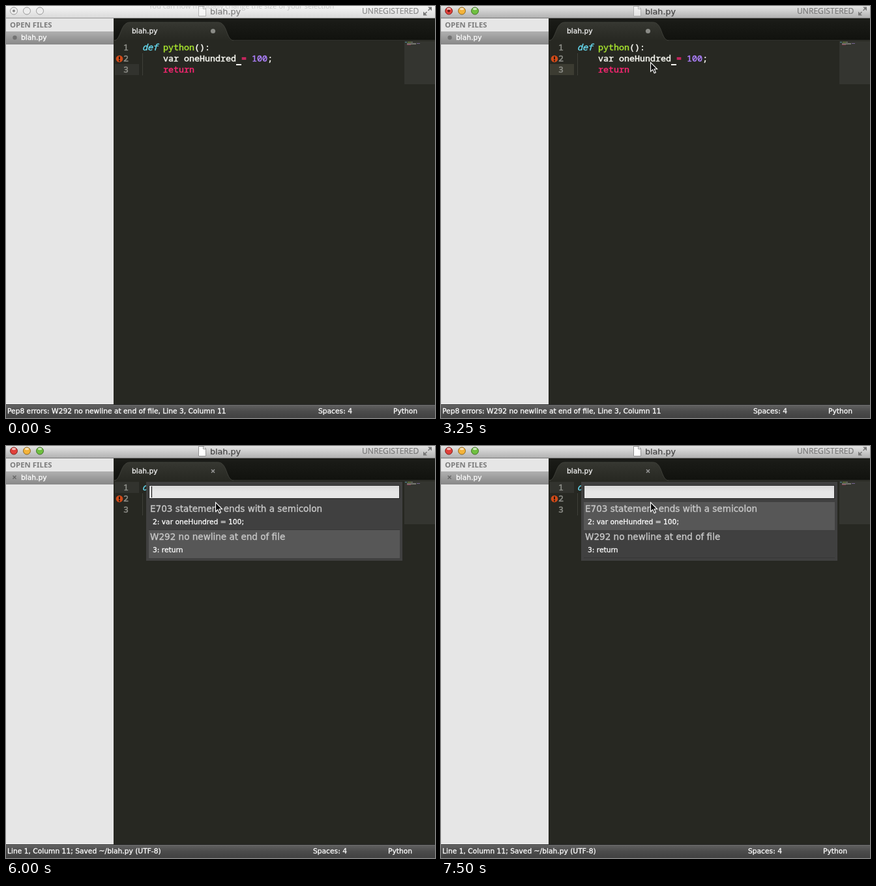
Animation, 658 px wide and 632 px high, one loop 8 s. Source, as an HTML page with a canvas:

```html
<!DOCTYPE html>
<html lang="en">
<head>
<meta charset="utf-8">
<title>Editor lint demo</title>
<style>
html, body { margin: 0; width: 658px; height: 632px; overflow: hidden; background: #272822; }
canvas { display: block; }
</style>
</head>
<body>
<canvas id="stage" width="658" height="632"></canvas>
<script>
const ctx = document.getElementById('stage').getContext('2d');
const LOOP = 8000;
const UI = '"DejaVu Sans", sans-serif';
const CAPS = '"Open Sans", sans-serif';
const MONO = '"Noto Sans Mono", monospace';
const SMALL = '10.7px ' + UI;
const CODE = '13.33px ' + MONO;
const CYAN = '#66d9ef', GREEN = '#a6e22e', PINK = '#f92672', PURPLE = '#ae81ff', WHITE = '#f8f8f2';

function rect(x, y, w, h, fill) {
  ctx.fillStyle = fill;
  ctx.fillRect(x, y, w, h);
}

function shade(y0, y1, ...colors) {
  const g = ctx.createLinearGradient(0, y0, 0, y1);
  colors.forEach((c, i) => g.addColorStop(i / (colors.length - 1), c));
  return g;
}

function circle(x, y, r, fill, stroke) {
  ctx.beginPath();
  ctx.arc(x, y, r, 0, Math.PI * 2);
  ctx.fillStyle = fill;
  ctx.fill();
  if (stroke) {
    ctx.strokeStyle = stroke;
    ctx.lineWidth = 1;
    ctx.stroke();
  }
}

function path(points, fill, stroke, width = 1) {
  ctx.beginPath();
  points.forEach(([x, y]) => ctx.lineTo(x, y));
  if (fill) {
    ctx.closePath();
    ctx.fillStyle = fill;
    ctx.fill();
  }
  if (stroke) {
    ctx.strokeStyle = stroke;
    ctx.lineWidth = width;
    ctx.stroke();
  }
}

// weight adds a hairline stroke, for slightly heavier glyphs
function text(str, x, y, font, color, weight = 0) {
  ctx.font = font;
  ctx.fillStyle = color;
  ctx.fillText(str, x, y);
  if (weight) {
    ctx.strokeStyle = color;
    ctx.lineWidth = weight;
    ctx.strokeText(str, x, y);
  }
}

function cross(x, y, color) {
  path([[x - 2.5, y - 2.5], [x + 2.5, y + 2.5]], null, color, 1.4);
  path([[x + 2.5, y - 2.5], [x - 2.5, y + 2.5]], null, color, 1.4);
}

// Last value whose start time has passed
function at(t, steps) {
  let value = steps[0][1];
  for (const [start, v] of steps) if (t >= start) value = v;
  return value;
}

function stateAt(t) {
  return {
    active: t >= 1750,
    saved: t >= 5000,
    line: at(t, [[0, 3], [3500, 2], [3750, 1]]),
    caret: at(t, [[0, 0], [1750, 1], [2000, .55], [2250, 0], [2750, 1], [3250, 0],
      [3500, 1], [4000, .55], [4250, 0], [4750, 1], [5000, 0]]),
    inputCaret: at(t, [[0, 0], [5000, 1], [5250, .55], [5500, 0], [6000, 1], [6250, .55],
      [6500, 0], [7000, 1], [7250, .55], [7500, 0]]),
    choice: at(t, [[0, 0], [6000, 1], [6250, 0], [6750, 1], [7250, 0]]),
    pointer: at(t, [[0, null], [250, [351, 17]], [750, [351, 20]], [1000, [321, 86]]]),
    ghost: t < 250
  };
}

function drawTitleBar(s) {
  rect(0, 0, 658, 18, s.active ? shade(0, 18, '#e4e4e4', '#b2b2b2') : shade(0, 18, '#f6f6f6', '#dadada'));
  rect(0, 18, 658, 1, s.active ? '#777' : '#969696');
  if (s.ghost) {
    text('You can now manually change the size of your selection', 219, 4, '11px ' + CAPS, 'rgba(110,110,110,.32)');
  }
  const lights = [['#e0403a', '#7d2622'], ['#f3b33a', '#8c6722'], ['#6fbf40', '#426f2b']];
  lights.forEach(([fill, edge], i) => {
    const x = 12 + i * 20;
    if (s.active) {
      circle(x, 7.5, 5.5, fill, edge);
      ctx.save();
      ctx.translate(x, 4.5);
      ctx.scale(1, .55);
      circle(0, 0, 3, 'rgba(255,255,255,.65)');
      ctx.restore();
    } else {
      circle(x, 7.5, 5.5, '#ededed', '#979797');
    }
  });
  if (!s.saved) circle(12, 7.5, 2, s.active ? '#641512' : '#858585');

  ctx.globalAlpha = s.saved ? 1 : .6;
  path([[295.5, .5], [303, .5], [306.5, 4], [306.5, 15.5], [295.5, 15.5]], '#fff', '#929292');
  path([[302.5, .5], [302.5, 4.5], [306.5, 4.5]], null, '#929292');
  ctx.globalAlpha = 1;
  text('blah.py', 313, 13, '12.7px ' + UI, s.active ? '#414141' : '#7d7d7d', .2);
  text('UNREGISTERED', 546, 12, '12.1px ' + CAPS, s.active ? '#777' : '#888', .2);

  const gray = '#777';
  path([[647, 1.5], [653, 1.5], [653, 7.5]], gray);
  path([[640, 8.5], [640, 14.5], [646, 14.5]], gray);
  path([[647.5, 7], [651, 3.5]], null, gray, 1.6);
  path([[642, 12.5], [645.5, 9]], null, gray, 1.6);
}

function drawSidebar(s) {
  rect(0, 19, 165, 592, '#e6e6e6');
  rect(165, 19, 1, 592, '#272822');
  text('OPEN FILES', 6, 33, 'bold 11.4px "Noto Sans", sans-serif', '#7c7c7c');
  rect(0, 39, 165, 20, shade(39, 59, '#b0b0b0', '#888'));
  if (s.saved) cross(13, 48, '#666');
  else circle(13.5, 48.5, 3.2, '#727272');
  text('blah.py', 23, 52, SMALL, '#fff', .3);
}

function drawTab(s) {
  rect(166, 19, 492, 34, shade(19, 53, '#1b1c18', '#11120e'));
  rect(166, 52, 492, 1, '#30312c');
  ctx.beginPath();
  ctx.moveTo(166, 53);
  ctx.bezierCurveTo(177, 52, 175, 25, 190, 25);
  ctx.lineTo(325, 25);
  ctx.bezierCurveTo(340, 25, 337, 52, 349, 53);
  ctx.fillStyle = shade(25, 53, '#363731', '#272822');
  ctx.fill();
  ctx.strokeStyle = '#3f403a';
  ctx.lineWidth = 1;
  ctx.stroke();
  text('blah.py', 193, 42, SMALL, '#f2f2f2', .3);
  if (s.saved) cross(317.5, 38.5, '#999');
  else circle(317.5, 38.5, 3.6, '#8a8b86');
}

function codeLine(row, parts) {
  for (const [col, str, color, style = ''] of parts) {
    text(str, 209 + col * 8, 51 + row * 17, style + CODE, color, .45);
  }
}

function drawEditor(s) {
  rect(166, 53, 492, 558, '#272822');
  rect(611, 54, 47, 66, '#343530');
  rect(167, 38 + s.line * 17, 37, 17, s.active && !s.saved ? '#3c3c32' : '#32332e');
  for (let n = 1; n <= 3; n++) text(String(n), 180, 51 + n * 17, CODE, '#90918b', .45);
  for (let y = 73; y < 106; y += 2) rect(209, y, 1, 1, '#55564f');

  circle(174, 81, 5.3, '#d04a18');
  rect(173, 77.5, 2, 4.5, '#2a1710');
  rect(173, 83, 2, 2, '#2a1710');

  codeLine(1, [[0, 'def', CYAN, 'italic '], [4, 'python', GREEN], [10, '():', WHITE]]);
  codeLine(2, [[4, 'var oneHundred', WHITE], [19, '=', PINK], [21, '100', PURPLE], [24, ';', WHITE]]);
  codeLine(3, [[4, 'return', PINK]]);
  rect(353, 89, 8, 2, '#f8f8f2');
  if (s.line === 1) rect(289, 72, 16, 1, '#c5c5bd');

  rect(612, 55, 3, 1, '#4f8d96');
  rect(616, 55, 5, 1, '#75943a');
  rect(621, 55, 3, 1, '#85867f');
  rect(615, 57, 14, 2, '#777871');
  rect(630, 57, 5, 1, '#766492');
  rect(615, 59, 6, 1, '#8e3e55');

  ctx.globalAlpha = s.caret;
  rect(288, 38 + s.line * 17, 1, 17, '#f8f8f0');
  ctx.globalAlpha = 1;
}

function drawStatus(s) {
  rect(0, 611, 658, 21, shade(611, 632, '#646464', '#4c4c4c', '#414141'));
  rect(0, 611, 658, 1, '#272727');
  rect(0, 612, 658, 1, '#707070');
  const lint = { 2: 'E703 statement ends with a semicolon', 3: 'W292 no newline at end of file' }[s.line];
  const message = (lint ? 'Pep8 errors: ' + lint + ', ' : '') + 'Line ' + s.line + ', Column 11' +
    (s.saved ? '; Saved ~/blah.py (UTF-8)' : '');
  const shift = [0, 0, 32, 8][s.line];
  text(message, 2, 625, SMALL, '#fff', .3);
  text('Spaces: 4', 471 + shift, 625, SMALL, '#fff', .3);
  text('Python', 586 + shift, 625, SMALL, '#fff', .3);
}

function drawPanel(s) {
  rect(215, 55, 393, 121, '#404040');
  rect(219, 60, 385, 21, '#292929');
  rect(220, 61, 383, 19, shade(61, 80, '#d8d8d8', '#e6e6e6', '#e6e6e6'));
  ctx.globalAlpha = s.inputCaret;
  rect(223, 62, 1, 17, '#000');
  ctx.globalAlpha = 1;
  const items = [
    ['E703 statement ends with a semicolon', '2: var oneHundred = 100;'],
    ['W292 no newline at end of file', '3: return']
  ];
  items.forEach(([title, detail], i) => {
    const y = 86 + i * 43;
    const chosen = i === s.choice;
    rect(219, y, 385, 43, chosen ? '#575757' : '#404040');
    if (!chosen) rect(219, y + 42, 385, 1, '#373737');
    text(title, 221, y + 15, '13.55px ' + UI, '#c8c8c8', .35);
    text(detail, 225, y + 34, SMALL, '#fff', .3);
  });
}

function drawPointer([x, y]) {
  const shape = [[.5, .5], [.5, 14.5], [3.7, 11.6], [6.2, 17], [8.4, 16], [6.1, 10.8], [10.6, 10.8]];
  path([...shape, shape[0]].map(([dx, dy]) => [x + dx, y + dy]), '#0b0b0b', '#fff', 1.1);
}

function draw(t) {
  const s = stateAt(t);
  drawEditor(s);
  drawTab(s);
  drawSidebar(s);
  drawTitleBar(s);
  drawStatus(s);
  if (s.saved) drawPanel(s);
  if (s.pointer) drawPointer(s.pointer);
}

const start = performance.now();
function tick() {
  draw((performance.now() - start) % LOOP);
  requestAnimationFrame(tick);
}
tick();
</script>
</body>
</html>
```
